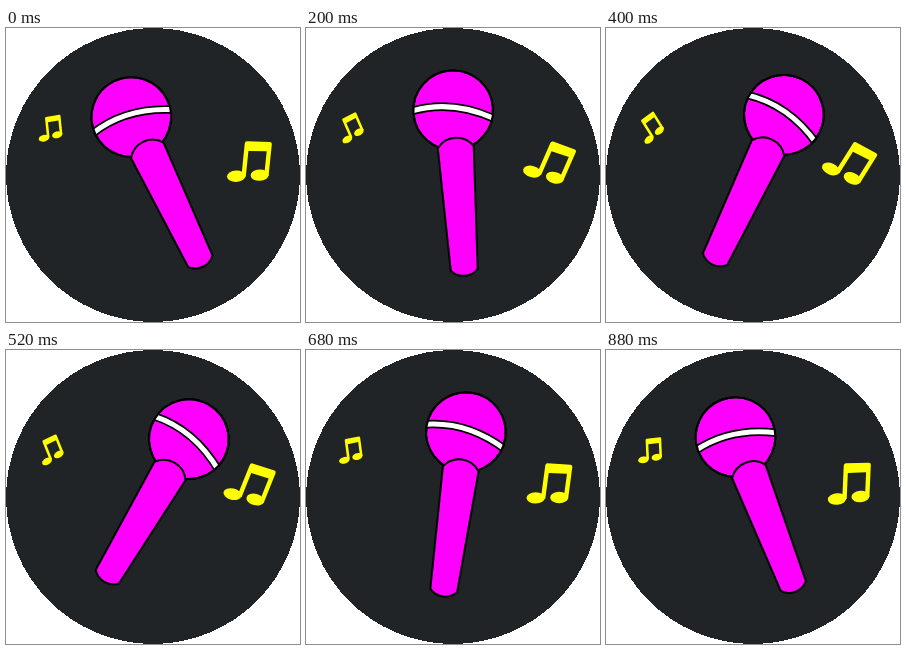
An HTML page that plays this animation: 294 px wide and 294 px high, repeating every 0.92 s.

```html
<!DOCTYPE html>
<html lang="en">
<head>
<meta charset="utf-8">
<title>Swinging microphone</title>
<style>
  html, body { margin: 0; width: 100%; height: 100%; overflow: hidden; background: #fff; }
  svg { display: block; width: 100vw; height: 100vh; }
</style>
</head>
<body>
<svg viewBox="0 0 294 294">
  <defs>
    <clipPath id="headClip"><circle cy="-61" r="39.8"/></clipPath>
    <g id="note" fill="#ff0">
      <path d="M-6-17Q-6-19.3-4-19.5L19-21Q21-21 21-19V13H16.6V-11.5L-1.6-10V16H-6Z"/>
      <ellipse cx="-11.2" cy="16.5" rx="9.2" ry="5.7" transform="rotate(-8 -11.2 16.5)"/>
      <ellipse cx="12" cy="13" rx="9" ry="5.7" transform="rotate(-8 12 13)"/>
    </g>
  </defs>
  <circle cx="147" cy="147" r="147" fill="#202426" shape-rendering="crispEdges"/>
  <g id="mic">
    <g transform="translate(-2.6 0)" fill="#f0f" stroke="#000" stroke-width="2" stroke-linejoin="round">
      <circle cy="-61" r="39.8"/>
      <g clip-path="url(#headClip)" fill="none">
        <path d="M-42-63Q0-72.4 42-49" stroke-width="8.5"/>
        <path d="M-42-63Q0-72.4 42-49" stroke="#fff" stroke-width="5"/>
      </g>
      <circle cy="-61" r="39.8" fill="none"/>
      <path d="M-18-24A21.8 21.8 0 0 1 18-24L13.5 98.8A18 18 0 0 1-13.5 98.8Z"/>
    </g>
  </g>
  <use id="smallNote" href="#note"/>
  <use id="bigNote" href="#note"/>
</svg>
<script>
  const LOOP = 920, STEP = 40;
  const [mic, smallNote, bigNote] =
    ["mic", "smallNote", "bigNote"].map(id => document.getElementById(id));

  // Triangle wave with softened turns, from about -0.84 to 0.84, highest at `peak`.
  const swing = (t, peak) =>
    Math.asin(0.97 * Math.cos(2 * Math.PI * (t - peak) / LOOP)) * 2 / Math.PI;

  const place = (el, x, y, angle, scale = 1) =>
    el.setAttribute("transform", `translate(${x} ${y}) rotate(${angle}) scale(${scale})`);

  function draw() {
    const t = Math.floor(performance.now() % LOOP / STEP) * STEP;
    const noteAngle = 16.5 + 21.2 * swing(t, 350);
    place(mic, 154, 143, 3.5 + 35.4 * swing(t, 480));
    place(bigNote, 243, 133, noteAngle);
    place(smallNote, 43.5, 100, -noteAngle, 0.58);
    requestAnimationFrame(draw);
  }
  draw();
</script>
</body>
</html>
```
